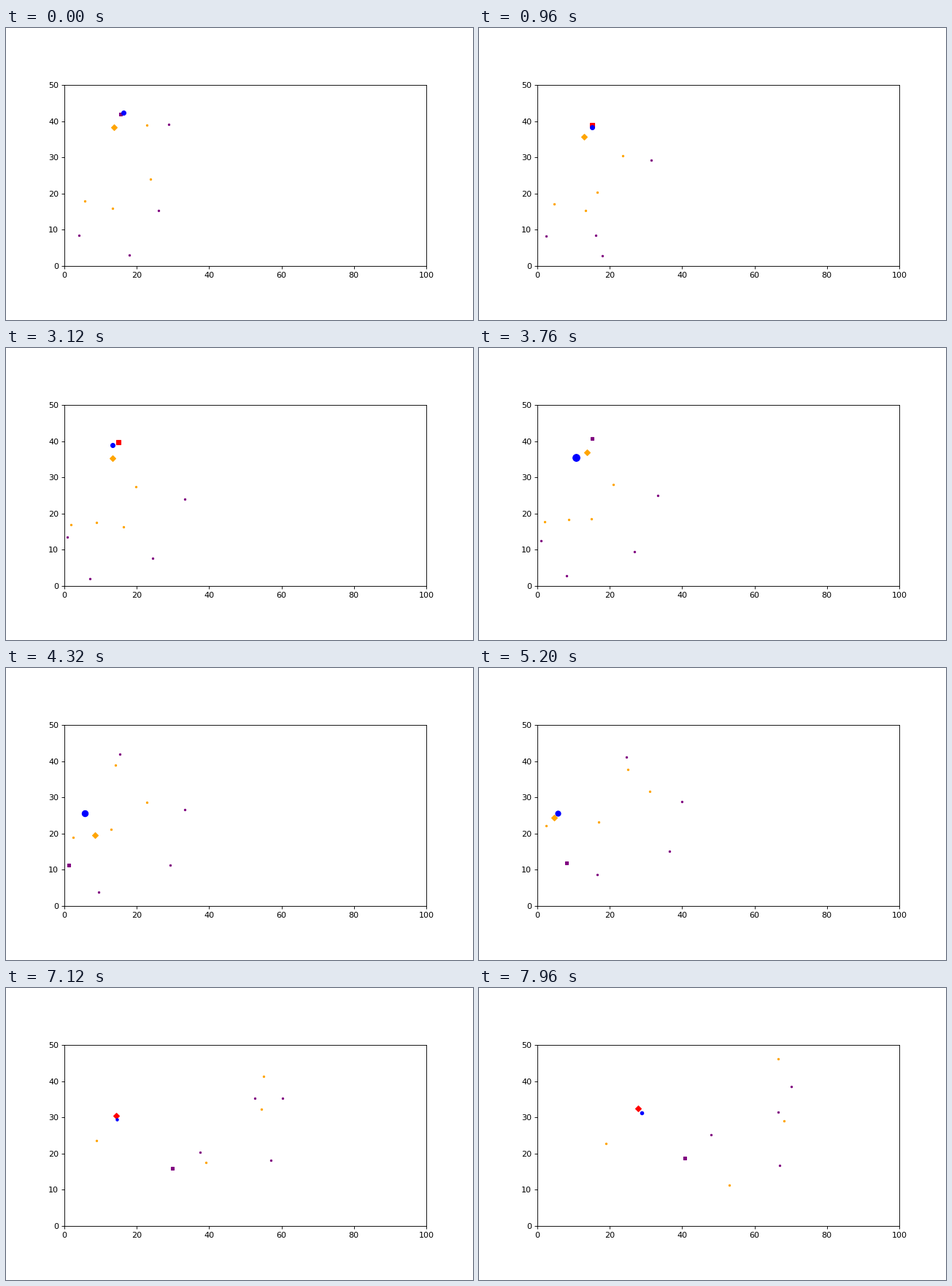
A matplotlib script that plays this animation: 640 px wide and 400 px high, repeating every 8 s.

```python
import numpy as np
import matplotlib.pyplot as plt
from matplotlib.animation import FuncAnimation

FRAMES, STEP = 200, 40
T = np.arange(FRAMES) * STEP / 1000
SCALE = 4.96                      # stage pixels per court foot
REACH = 2.0 * SCALE               # how far a player can hold the ball
SETUP = np.array([0, 0.96, 3.12, 4.32])   # seconds of the half-court play
BREAK, END = 4.32, 7.96           # the run to the other end
RIM = np.array([108, 198.5])


def ramp(start, stop):
    return np.clip((T - start) / (stop - start), 0, 1)


def lerp(a, b, s):
    return a + (b - a) * s


def glide(v):
    """Monotone cubic curve through the half-court values."""
    h = np.diff(SETUP)
    slope = np.diff(v) / h
    a, b = slope[:-1], slope[1:]
    same = a * b > 0
    m = np.r_[slope[0], np.where(same, 2 * a * b / np.where(same, a + b, 1), 0),
              slope[-1]]
    t = np.minimum(T, BREAK)
    i = np.clip(np.searchsorted(SETUP, t, side="right") - 1, 0, len(h) - 1)
    u = (t - SETUP[i]) / h[i]
    return ((1 + 2 * u) * (1 - u) ** 2 * v[i] + u * (1 - u) ** 2 * h[i] * m[i]
            + u * u * (3 - 2 * u) * v[i + 1] + u * u * (u - 1) * h[i] * m[i + 1])


def player(*setup, goal, bow=(0, 0), pace=1.2):
    """Half-court moves, then one accelerating, bowed run to the goal."""
    spots = np.array(setup, float)
    u = ramp(BREAK, END)[:, None]
    moves = np.column_stack([glide(c) for c in spots.T])
    run = (np.array(goal) - spots[-1]) * u ** pace
    return moves + run + np.array(bow) * np.sin(np.pi * u)


shooter = player((157, 118), (155, 133), (154, 129), (156, 118),
                 goal=(410, 170), bow=(0, -8))
wing = player((223, 132), (236, 181), (245, 207), (245, 194), goal=(428, 135))
screener = player((209, 250), (160, 284), (115, 316), (127, 307),
                  goal=(318, 201), bow=(0, -7))
corner = player((100, 284), (92, 285), (84, 259), (86, 270),
                goal=(282, 233), bow=(-2, 6))
popper = player((169, 311), (169, 312), (201, 288), (225, 270),
                goal=(412, 243), bow=(3, -21))

contester = player((148, 136), (144, 149), (146, 151), (150, 133),
                   goal=(418, 182), bow=(7, -4))
runner = player((193, 133), (197, 175), (178, 190), (193, 184),
                goal=(410, 97), bow=(2, 1))
trailer = player((198, 207), (162, 225), (124, 239), (122, 229),
                 goal=(218, 165), bow=(-31, -32), pace=2.5)
big = player((108, 237), (103, 241), (89, 242), (92, 232),
             goal=(174, 213), bow=(-1, -23), pace=3.5)
middle = player((146, 247), (146, 250), (161, 245), (144, 221),
                goal=(343, 270), bow=(-1, -22), pace=1.6)

# The ball is held, shot at the rim, rebounds and is dribbled away.
shot, fall, catch = ramp(3.5, BREAK), ramp(BREAK, 6.08), ramp(6.08, 7.0)
held = shooter + np.column_stack([4 - 12 * T / 3.12, 4 - 6 * np.exp(-T / 0.4)])
carried = trailer + np.column_stack([5 * ramp(BREAK, END) ** 6,
                                     np.full(FRAMES, 5.5)])
ball = lerp(lerp(held, RIM, shot[:, None]), carried, catch[:, None])
bounce = 3 + np.abs(np.sin(np.pi * (T - 7.12) / 0.56))
size = lerp(5.3 + 2.2 * (shot - fall) + 3.2 * np.sin(np.pi * shot), bounce, catch)

purple = np.stack([shooter, wing, screener, corner, popper], axis=1)
orange = np.stack([contester, runner, trailer, big, middle], axis=1)

fig, ax = plt.subplots(figsize=(8, 5), dpi=80)
ax.set_xlim(0, 100)
ax.set_ylim(0, 50)
ax.set_aspect("equal")


def add(style, color, z):
    return ax.plot([], [], style, color=color, markersize=4, zorder=z)[0]


def place(artist, spots):
    artist.set_data((spots[:, 0] - 80) / SCALE, (326 - spots[:, 1]) / SCALE)


teams = [(purple, add(".", "purple", 3), add("s", "purple", 4), "purple", 4),
         (orange, add(".", "orange", 3), add("D", "orange", 4), "orange", 4.5)]
ball_dot = add("o", "blue", 5)


def draw(k):
    for team, dots, mark, color, width in teams:
        spots = team[k]
        gaps = np.hypot(*(spots - ball[k]).T)
        near = gaps.argmin()
        holds = k > 1 and gaps[near] < REACH and size[k] < 5.5
        place(dots, spots)
        place(mark, spots[near:near + 1])
        mark.set_color("red" if holds else color)
        mark.set_markersize(width + holds)
    place(ball_dot, ball[k:k + 1])
    ball_dot.set_markersize(size[k])


anim = FuncAnimation(fig, draw, frames=FRAMES, interval=STEP,
                     init_func=lambda: draw(0), repeat=True, repeat_delay=0)
plt.show()
```
